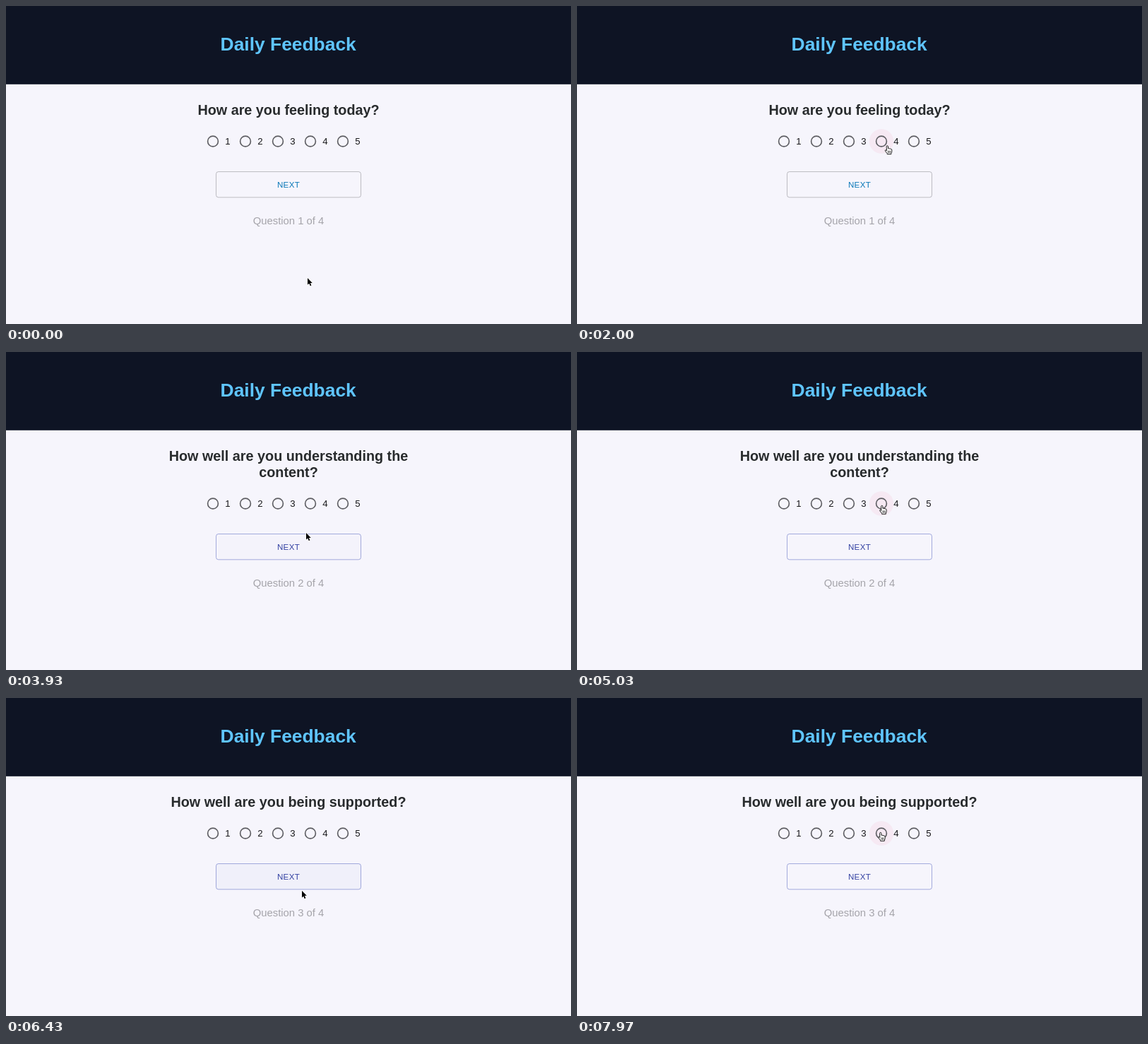
Animation, 800 px wide and 450 px high, one loop 8000 ms. Source, as an HTML page:

```html
<!DOCTYPE html>
<html lang="en">
<head>
<meta charset="utf-8">
<title>Daily Feedback</title>
<style>
  html, body { margin: 0; width: 100%; height: 100%; overflow: hidden; background: #f6f5fc; }
  svg { display: block; width: 100vw; height: 100vh; font-family: "Liberation Sans", Arial, Helvetica, sans-serif; }
  text { text-anchor: middle; }
  .title { font-size: 26.4px; font-weight: 700; fill: #5fc5ff; }
  .heading { font-size: 19.8px; font-weight: 700; fill: #282b2d; }
  .digit { font-size: 13.2px; fill: #17171a; }
  .next { font-size: 11.55px; letter-spacing: .33px; }
  .count { font-size: 14.85px; fill: #a5a4aa; }
</style>
</head>
<body>
<svg id="stage" viewBox="0 0 800 450">
  <defs>
    <clipPath id="clip"><rect x="297" y="234" width="206" height="37" rx="3.5"/></clipPath>
  </defs>
  <rect width="800" height="450" fill="#f6f5fc"/>
  <rect width="800" height="110.8" fill="#0e1424"/>
  <text class="title" x="399.7" y="62.5">Daily Feedback</text>
  <text class="heading" id="line1" x="400" y="154"></text>
  <text class="heading" id="line2" x="400" y="177"></text>
  <g id="form">
    <g id="radios"></g>
    <rect id="button" x="297.5" y="234.5" width="205" height="36.3" rx="3.3"/>
    <g clip-path="url(#clip)"><circle id="wave"/></g>
    <text class="next" id="next" x="400" y="257">NEXT</text>
    <text class="count" id="count" x="400" y="309.4"></text>
  </g>
  <g id="cursor">
    <path id="arrow" d="M0 0V9.6L2.2 7.6L3.7 11.1L5.4 10.4L3.9 7H6.8Z" fill="#000" stroke="#fff" stroke-width="1.2" paint-order="stroke" stroke-linejoin="round"/>
    <g id="hand" stroke="#111" stroke-width=".95" stroke-linejoin="round" stroke-linecap="round">
      <path fill="#fff" d="M-1.4 1.4Q-1.4 .3 -.3 .3T.9 1.4V4.2Q2.3 3.6 2.9 4.6Q4.2 4.1 4.8 5.1Q6.2 4.9 6.2 6.3V8.4Q6.2 10 5.3 11V12.3H-.4V11.3L-3 8Q-3.8 6.5 -2.6 6.2L-1.4 7.2Z"/>
      <path fill="none" stroke-width=".7" d="M.9 7.8v2.6M2.5 7.8v2.6M4.1 7.8v2.6"/>
    </g>
  </g>
</svg>
<script>
const LOOP = 8000;
const ACCENT = "#e9004f";
const INDIGO = "63,81,181";
const SHIFT = 23;
const ROW_Y = 191.5;

const questions = [
  { from: 0, lines: ["How are you feeling today?", ""], pick: 2540 },
  { from: 3480, lines: ["How well are you understanding the", "content?"], pick: 5060 },
  { from: 6080, lines: ["How well are you being supported?", ""], pick: Infinity }
];
const presses = [3390, 5970];

// time, x, y of the pointer tip
const path = [
  [0, 427, 385], [630, 427, 385], [900, 437, 345], [1130, 455, 274], [1330, 469, 218],
  [1460, 467, 204], [1800, 448, 197], [2270, 433.5, 199], [2840, 433.5, 199],
  [3010, 431, 232], [3160, 427, 263], [3330, 425, 256], [4200, 425, 256],
  [4560, 429, 232], [5000, 432, 217], [5400, 432, 217], [5600, 424, 258],
  [5830, 420, 268], [5880, 420, 268], [5950, 419, 272.8], [7270, 419, 272.8],
  [7300, 418, 265], [7440, 420, 257], [7700, 427, 212], [7940, 430, 190], [8000, 430, 190]
];

const $ = id => document.getElementById(id);
const clamp = v => Math.max(0, Math.min(1, v));
const set = (el, attrs) => { for (const k in attrs) el.setAttribute(k, attrs[k]); };

function add(parent, tag, attrs) {
  const el = document.createElementNS("http://www.w3.org/2000/svg", tag);
  set(el, attrs);
  parent.appendChild(el);
  return el;
}

// cubic-bezier(.4, 0, .2, 1)
function ease(v) {
  v = clamp(v);
  let lo = 0, hi = 1;
  for (let i = 0; i < 16; i++) {
    const m = (lo + hi) / 2, n = 1 - m;
    if (1.2 * n * n * m + .6 * n * m * m + m * m * m < v) lo = m; else hi = m;
  }
  return lo * lo * (3 - 2 * lo);
}

// Hermite curve through the path, at rest beside every pause
function slope(i, axis) {
  const a = path[i - 1], b = path[i], c = path[i + 1];
  const still = (p, q) => p[1] === q[1] && p[2] === q[2];
  if (!a || !c || still(a, b) || still(b, c)) return 0;
  return (c[axis] - a[axis]) / (c[0] - a[0]);
}

function pointer(t) {
  let i = 0;
  while (i < path.length - 2 && path[i + 1][0] <= t) i++;
  const a = path[i], b = path[i + 1], d = b[0] - a[0];
  const u = clamp((t - a[0]) / d), w = 1 - u;
  const at = k => w * w * (1 + 2 * u) * a[k] + u * u * (3 - 2 * u) * b[k]
    + d * u * w * (w * slope(i, k) - u * slope(i + 1, k));
  return { x: at(1), y: at(2) };
}

const indexAt = t => questions.findLastIndex(q => t >= q.from);
const shiftAt = t => indexAt(t) === 1 ? SHIFT : 0;

function overButton(t) {
  const p = pointer(t), y = p.y - shiftAt(t);
  return p.x > 297 && p.x < 503 && y > 234 && y < 271.5;
}
function overRow(t) {
  const p = pointer(t);
  return p.x > 276 && p.x < 506 && Math.abs(p.y - shiftAt(t) - ROW_Y) < 17;
}
function overRadio(t, x) {
  const p = pointer(t);
  return Math.hypot(p.x - x, p.y - shiftAt(t) - ROW_Y) < 17.3;
}

// share of the last `span` ms that passed the test: a linear fade in and out
function fade(test, t, span) {
  const n = 20;
  let sum = 0;
  for (let i = 0; i < n; i++) sum += test(Math.max(0, t - span * i / n)) ? 1 : 0;
  return sum / n;
}

function ripple(el, age, r, strength) {
  const on = age >= 0 && age < 660;
  set(el, {
    r: on ? r * ease(age / 550) : 0,
    opacity: on ? strength * (1 - ease((age - 110) / 550)) : 0
  });
}

const radios = [1, 2, 3, 4, 5].map(n => {
  const cx = 247 + 46 * n, at = { cx, cy: ROW_Y }, g = $("radios");
  const radio = {
    n, cx,
    halo: add(g, "circle", { ...at, r: 17.3, fill: ACCENT }),
    wave: add(g, "circle", { ...at, r: 0, fill: ACCENT }),
    ring: add(g, "circle", { ...at, r: 7.4, fill: "none", "stroke-width": 1.65 }),
    dot: add(g, "circle", { ...at, r: 0, fill: ACCENT })
  };
  add(g, "text", { class: "digit", x: cx + 20.8, y: 196 }).textContent = n;
  return radio;
});

function draw(t) {
  const index = indexAt(t), q = questions[index];
  $("line1").textContent = q.lines[0];
  $("line2").textContent = q.lines[1];
  $("count").textContent = `Question ${index + 1} of 4`;
  set($("form"), { transform: `translate(0 ${shiftAt(t)})` });

  for (const r of radios) {
    const age = r.n === 4 ? t - q.pick : -1;
    set(r.halo, { opacity: .05 * fade(s => overRadio(s, r.cx), t, 150) });
    set(r.ring, { stroke: age >= 0 ? ACCENT : "#5e5e63" });
    set(r.dot, { r: 4.2 * ease(age / 150) });
    ripple(r.wave, age, 17.3, .3);
  }

  const hover = fade(overButton, t, 250);
  const first = index === 0;
  set($("button"), first
    ? { fill: `rgba(0,0,0,${.025 * hover})`, stroke: "rgba(0,0,0,.23)" }
    : { fill: `rgba(${INDIGO},${.06 * hover})`, stroke: `rgba(${INDIGO},${.45 + .45 * hover})` });
  const ink = first ? "#0a78b8" : "#3442a2";
  set($("next"), { fill: ink });

  const press = presses.findLast(p => t >= p) ?? Infinity;
  if (press < t) {
    const p = pointer(press);
    set($("wave"), { cx: p.x, cy: p.y - shiftAt(press), fill: ink });
  }
  ripple($("wave"), t - press, 125, .3);

  const p = pointer(t), hand = overButton(t) || overRow(t);
  set($("cursor"), { transform: `translate(${p.x} ${p.y})` });
  set($("hand"), { visibility: hand ? "visible" : "hidden" });
  set($("arrow"), { visibility: hand ? "hidden" : "visible" });
}

const start = performance.now();
function tick() {
  draw((performance.now() - start) % LOOP);
  requestAnimationFrame(tick);
}
tick();
</script>
</body>
</html>
```
